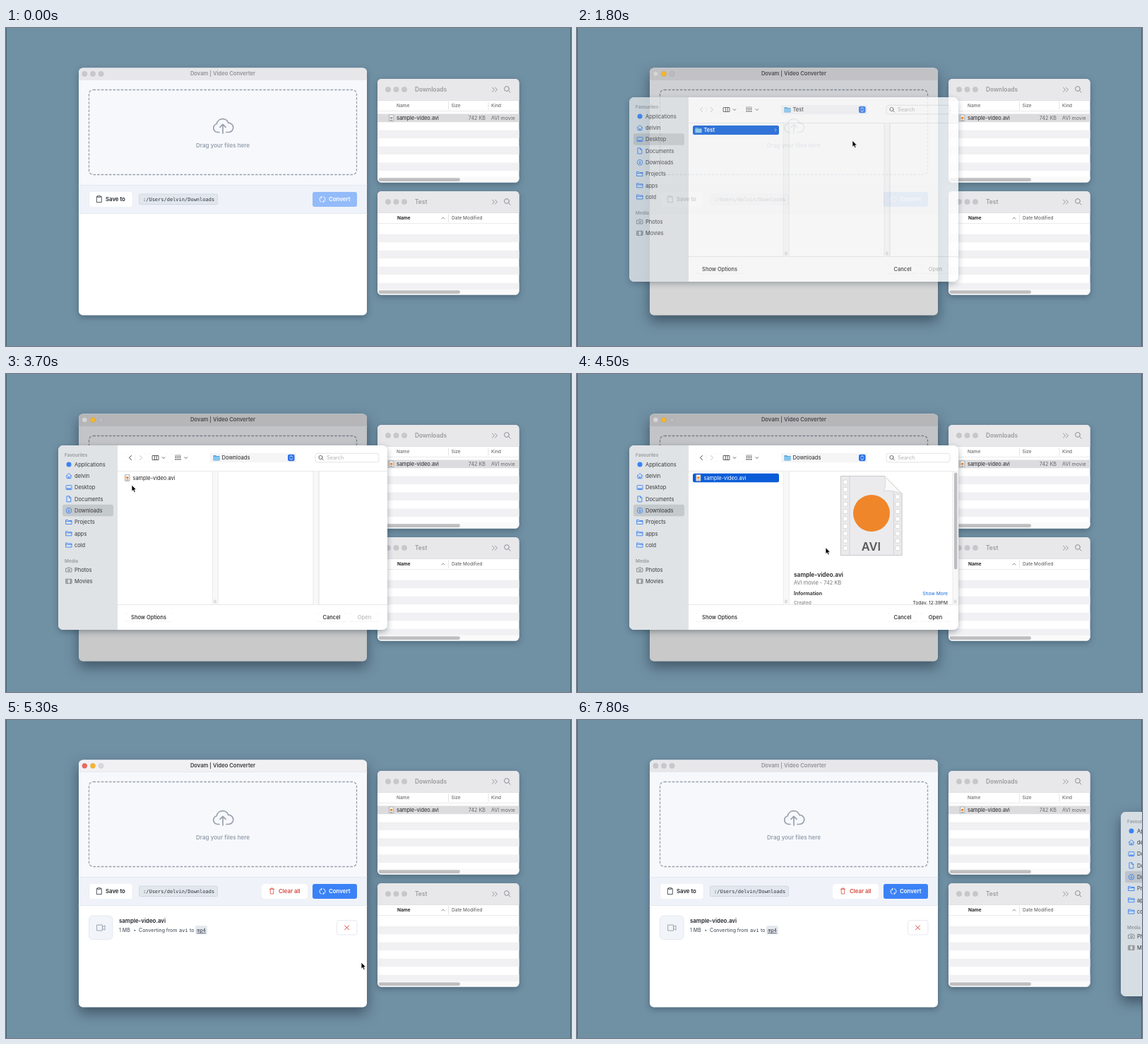
Animation of 800 by 450 pixels, one loop 8000 ms. Source, as an HTML page:

```html
<!DOCTYPE html>
<html lang="en">
<head>
<meta charset="utf-8">
<title>Video converter</title>
<style>
  html, body { margin: 0; width: 100%; height: 100%; overflow: hidden; background: #7090a4; }
  svg { display: block; width: 800px; height: 450px; font-family: Inter, Roboto, sans-serif; }
  text { white-space: pre; }
  .mono { font-family: "DejaVu Sans Mono", monospace; }
  .b { font-weight: 600; }
  .m { font-weight: 500; }
  .line { fill: none; stroke-linecap: round; stroke-linejoin: round; }
  .soft { filter: drop-shadow(0 3px 4px rgba(20, 35, 50, .36)); }
  .deep { filter: drop-shadow(0 8px 9px rgba(15, 25, 40, .5)); }
  .btn { filter: drop-shadow(0 .5px .7px rgba(0, 0, 0, .22)); }
</style>
</head>
<body>
<svg id="stage" viewBox="0 0 800 450"></svg>
<script>
const APP = 'Dovam', USER = 'delvin', FILE = 'sample-video.avi';
const BLUE = '#3b82f6', GREY = '#9b9b9e', INK = '#262629', RED = '#d4483f', ORANGE = '#f0862a';

const text = (x, y, s, size, fill = INK, attrs = '') =>
  `<text x="${x}" y="${y}" font-size="${size}" fill="${fill}" ${attrs}>${s}</text>`;
const rect = (x, y, w, h, r, fill, attrs = '') =>
  `<rect x="${x}" y="${y}" width="${w}" height="${h}" rx="${r}" fill="${fill}" ${attrs}/>`;
const dot = (x, y, r, fill, attrs = '') => `<circle cx="${x}" cy="${y}" r="${r}" fill="${fill}" ${attrs}/>`;
const line = (d, color, w = 1, attrs = '') =>
  `<path class="line" d="${d}" stroke="${color}" stroke-width="${w}" ${attrs}/>`;
const group = (id, ...parts) => `<g id="${id}">${parts.join('')}</g>`;
const at = (x, y, s) => `<g transform="translate(${x} ${y})">${s}</g>`;
const range = (n, fn) => Array.from({ length: n }, (_, i) => fn(i)).join('');
const BOLD = 'class="b"', MED = 'class="m"', MID = 'text-anchor="middle"', END = 'text-anchor="end"';

const lens = (x, y, r, color) =>
  line(`M${x + r} ${y}a${r} ${r} 0 1 0 ${-2 * r} 0a${r} ${r} 0 1 0 ${2 * r} 0M${x + r * .7} ${y + r * .7}l${r * .8} ${r * .8}`, color, .9);
const folder = (x, y) =>
  `<path d="M${x} ${y - 3.5}h3.5l1 1h4.5v6.5h-9z" fill="#58a6dc"/>` + rect(x, y - 1.5, 9, 5, .6, '#84c6ee');
const filePic = (x, y) =>
  rect(x, y, 6.6, 9, .4, '#fbfbfb', 'stroke="#8f8f92" stroke-width=".6"') +
  line(`M${x + 1} ${y + 1}v7M${x + 5.6} ${y + 1}v7`, '#a9a9ab', .5, 'stroke-dasharray=".6 1"') +
  dot(x + 3.3, y + 4.2, 1.7, ORANGE, 'class="badge"') + rect(x + 1.8, y + 7, 3, .9, 0, '#77777a');

// Finder-like list windows
function listWindow(y, title, top, bands, body) {
  const h = 146.5;
  return rect(526, y, 200.5, h, 5.5, '#fff', 'class="soft"') +
    `<path d="M526 ${y + 30.5}v-25a5.5 5.5 0 0 1 5.5-5.5h189.5a5.5 5.5 0 0 1 5.5 5.5v25z" fill="#e8e7ea"/>` +
    [541, 552.5, 564].map(x => dot(x, y + 15, 3.6, '#c8c7ca', 'stroke="#b9b8bb" stroke-width=".5"')).join('') +
    text(579, y + 18, title, 8.4, GREY, BOLD) +
    line(`M688.5 ${y + 12.3}l3 2.9-3 2.9M692.5 ${y + 12.3}l3 2.9-3 2.9`, '#8d8d90', .9) +
    lens(709, y + 14, 3.4, '#858588') +
    range(bands, i => rect(526, top + i * 23, 200.5, 11.5, 0, '#f1f1f3')) +
    line(`M526.5 ${y + 30.5}h199.5`, '#d6d5d8', .6) + line(`M526.5 ${y + 45.5}h199.5`, '#e2e2e4', .7) +
    line(`M626.5 ${y + 32.5}v11`, '#d9d9db', .7) +
    `<path d="M526 ${y + 138.5}h200.5v2.5a5.5 5.5 0 0 1-5.5 5.5h-189.5a5.5 5.5 0 0 1-5.5-5.5z" fill="#fafafa"/>` +
    rect(527.5, y + 140.3, 115.5, 4.6, 2.3, '#bfbfc1') + body;
}

const downloads = listWindow(72, 'Downloads', 144.5, 3,
  line('M683 104.5v11', '#d9d9db', .7) +
  text(553, 112.2, 'Name', 6.5, '#6c6c70', MED) + text(630.5, 112.2, 'Size', 6.5, '#6c6c70', MED) +
  text(687, 112.2, 'Kind', 6.5, '#6c6c70', MED) +
  rect(526, 121.5, 200.5, 11.7, 0, '#dcdcde') + filePic(542.3, 123) +
  text(553, 130, FILE, 7.4) + text(679, 130, '742 KB', 7.2, '#6a6a6d', END) + text(687, 130, 'AVI movie', 7.2, '#6a6a6d'));

const test = listWindow(231, 'Test', 291.7, 3,
  rect(526, 360.7, 200.5, 9, 0, '#f1f1f3') +
  text(554, 271, 'Name', 6.5, INK, 'font-weight="700"') + line('M617 270l2-2 2 2', '#77777a', .8) +
  text(631, 271, 'Date Modified', 6.5, '#6c6c70', MED));

// Main window
const swirl = x => line(`M${x - 1.5} 246.3a4 4 0 0 1-.6-7.1l1.4-.4M${x + 1.5} 238.7a4 4 0 0 1 .6 7.1l-1.4.4M${x - 1.4} 238.8l-.2 2M${x + 1.4} 246.2l.2-2`, '#fff', .9);
const button = (x, y, w, h = 21) => rect(x, y, w, h, 3, '#fff', 'class="btn"');

const main =
  rect(103, 56.5, 408, 350, 6, '#fff', 'id="shadow"') +
  '<path id="bar" d="M103 73.5v-11a6 6 0 0 1 6-6h396a6 6 0 0 1 6 6v11z"/>' +
  rect(103, 73.5, 408, 149, 0, '#f6f8fc') + rect(103, 222.5, 408, 40, 0, '#eff3f9') +
  line('M103 73.5h408M103 222.5h408M103 262.5h408', '#e0e5ec', .8) +
  text(307, 67.4, `${APP} | Video Converter`, 7.6, INK, 'class="b" text-anchor="middle" id="title"') +
  rect(117.5, 87.5, 379, 120, 6, 'none', 'stroke="#98a1ad" stroke-width="1.3" stroke-dasharray="3.6 2"') +
  line('M302 147.5h-2.5a6 6 0 0 1-1.2-11.8a8.6 8.6 0 0 1 16.6-1.3a5.9 5.9 0 0 1 .6 13.1h-3.5M307 149v-12M303 140.3l4-4 4 4', '#98a1ad', 1.7) +
  text(307, 169, 'Drag your files here', 8.1, '#8b96a4', `${MED} ${MID}`) +
  button(117.5, 232, 62) +
  line('M129.3 238.6h-1v8h7v-8h-1M129.8 237.6h4v1.8h-4z', '#3f4650', .9) +
  text(141, 245.3, 'Save to', 7.8, '#20242b', BOLD) +
  rect(188.5, 235, 111, 14.7, 2, '#e2e7ed', 'stroke="#c9d0d8" stroke-width=".7"') +
  text(194, 244.7, `:/Users/${USER}/Downloads`, 7, '#2c333d', 'class="mono"') +
  rect(434, 232, 63, 21, 3, BLUE, 'id="convert"') + swirl(448) +
  text(457, 245.3, 'Convert', 7.9, '#fff', BOLD) +
  group('item',
    button(362, 232, 65),
    line('M373.5 239.3h6M375 239v-1h3v1M374 239.5l.4 6.5h4.2l.4-6.5', RED, .8),
    text(386, 245.3, 'Clear all', 7.8, RED, BOLD),
    rect(117.5, 277, 33.5, 33.5, 5, '#f1f4f9', 'stroke="#e0e5ec" stroke-width=".8"'),
    line('M129 290h7.5v8h-7.5zM136.5 293l3.5-2.2v6.4l-3.5-2.2', '#9aa4b1', 1),
    text(160, 286.7, FILE, 7.9, '#20242b', BOLD),
    text(160, 300, '1 MB', 7, '#565e69', MED), dot(182.3, 297.8, 1, '#565e69'),
    text(188, 300, 'Converting from', 7, '#565e69', MED),
    text(245, 300, 'avi', 7, '#30363f', 'class="mono"'), text(260, 300, 'to', 7, '#565e69', MED),
    rect(268, 291, 17, 13, 2, '#e5e9ef'),
    text(270.2, 300, 'mp4', 7, '#30363f', 'class="mono" text-decoration="underline"'),
    rect(468.5, 283.5, 28.5, 20.5, 3, '#fff', 'stroke="#e6e9ee" stroke-width="1"'),
    line('M479.5 290.8l6 6M485.5 290.8l-6 6', RED, 1)) +
  rect(103, 56.5, 408, 350, 6, '#000', 'id="dim"') +
  [111.3, 123, 134.5].map((x, i) => dot(x, 64.8, 3.6, '#ccc', `id="light${i}" stroke="rgba(0,0,0,.13)" stroke-width=".5"`)).join('');

// File dialog
const home = line('M-4 0l4-3.6 4 3.6M-2.8-.6v4h5.6v-4M-.7 3.2v-2.2h1.4v2.2', BLUE, .9);
const desk = rect(-4, -3, 8, 6, .8, 'none', `stroke="${BLUE}" stroke-width=".9"`) + rect(-3, 1, 6, 1.2, 0, BLUE);
const doc = line('M-2.7-4h3.3l2.2 2.2v5.8h-5.5zM.5-4v2.3h2.3', BLUE, .9);
const down = dot(0, 0, 3.8, 'none', `stroke="${BLUE}" stroke-width=".9"`) + line('M0-1.8v3.4M-1.4.4l1.4 1.4 1.4-1.4', BLUE, .9);
const dir = line('M-4-3h2.6l1 1h4.4v5h-8zM-4-.9h8', BLUE, .9);
const camera = line('M-4-2h2l.8-1.2h2.4l.8 1.2h2v5h-8zM1.4.4a1.4 1.4 0 1 0-2.8 0a1.4 1.4 0 1 0 2.8 0', '#77797c', .8);
const film = line('M-4-3h8v6h-8zM-2.2-3v6M2.2-3v6M-4-1h1.8M-4 1h1.8M2.2-1h1.8M2.2 1h1.8', '#77797c', .8);
const places = [
  ['Applications', dot(0, 0, 3.5, BLUE)], [USER, home], ['Desktop', desk], ['Documents', doc],
  ['Downloads', down], ['Projects', dir], ['apps', dir], ['cold', dir]];
const entry = ([name, icon], y) => at(89, y, icon) + text(97, y + 2.7, name, 7.5, '#38393c');
const DESKTOP_Y = 152.3, DOWNLOADS_Y = 184.8;

const sidebar = (fill, selAttr = '') =>
  `<path d="M158 101v261h-77a7 7 0 0 1-7-7v-247a7 7 0 0 1 7-7z" fill="${fill}"/>` +
  rect(80, DOWNLOADS_Y, 72, 16.5, 3, 'rgba(60,65,70,.16)', selAttr) +
  text(83, 117, 'Favourites', 6.4, '#94989c', BOLD) +
  places.map((p, i) => entry(p, 128 + i * 16.3)).join('') +
  text(83, 266.5, 'Media', 6.4, '#94989c', BOLD) + entry(['Photos', camera], 277) + entry(['Movies', film], 293.3);

const grip = x => line(`M${x - 1} 320v4M${x + 1} 320v4`, '#b4b4b6', .7);
const strip = x => rect(x, 137.5, 8, 189, 0, '#f8f8f8') + line(`M${x} 137.5v189M${x + 8} 137.5v189`, '#e4e4e6', .7);
const pill = (x, w, label, attrs = '') =>
  rect(x, 338, w, 12.7, 3, '#fff', 'class="btn"') + text(x + w / 2, 346.7, label, 7.5, INK, `${MID} ${attrs}`);
const holes = x => range(10, i => rect(x, 150 + i * 10.4, 6, 6, 1, '#fff', 'stroke="#c8c8ca" stroke-width=".6"'));

const preview = group('preview',
  rect(164, 140.8, 122, 12.5, 2.5, '#0a5cd8', 'id="row"'),
  strip(532), grip(535.5),
  rect(534, 139.5, 4.4, 137, 2.2, '#bdbdbf'),
  '<path d="M373.5 144.5h62l24.5 25v87h-86.5z" fill="#ebebed" stroke="#c2c2c5" stroke-width=".7" class="btn"/>',
  rect(385.5, 145, 1, 111, 0, '#d3d3d5'), rect(448, 158, 1, 98, 0, '#d3d3d5'),
  holes(377), range(8, i => rect(451, 170.8 + i * 10.4, 6, 6, 1, '#fff', 'stroke="#c8c8ca" stroke-width=".6"')),
  '<path d="M435.5 144.5q3 12-1 21q11-2 25.500 4z" fill="#fafafa" stroke="#c6c6c8" stroke-width=".6"/>',
  dot(417, 197, 26, ORANGE),
  text(416.5, 249.7, 'AVI', 16.5, '#5a5a5d', `${BOLD} ${MID}`),
  text(307, 286.8, FILE, 8.4, INK, BOLD), text(307, 298.2, 'AVI movie - 742 KB', 7.4, '#77777a'),
  text(307, 312.7, 'Information', 7.2, INK, BOLD), text(525, 312.7, 'Show More', 6.7, '#1668dc', END),
  '<g clip-path="url(#fold)">' + text(307, 325.7, 'Created', 6.6, '#77777a') +
  text(525, 325.7, 'Today, 12:39PM', 6.6, INK, END) + '</g>');

const dialog = group('dialog',
  rect(74, 101, 466, 261, 7, '#fff', 'class="soft"'),
  sidebar('#dfe3e6', 'id="sel"'),
  rect(168, 112, 30, 13, 3, '#fff', 'class="btn"'), line('M183 114v9', '#e4e4e6', .6),
  line('M177.5 115.500l-3 3 3 3', '#47474a', 1, 'id="back"'), line('M189.500 115.500l3 3-3 3', '#c3c3c5', 1),
  rect(202, 112, 27, 13, 3, '#fff', 'class="btn"'), rect(234, 112, 26, 13, 3, '#fff', 'class="btn"'),
  line('M207.500 115.500h8.500v6h-8.500zM210.400 115.500v6M213.200 115.500v6M221.200 117.700l1.800 1.800 1.800-1.800M253 117.700l1.800 1.800 1.800-1.800', '#4d4d50', .9),
  range(6, i => rect(239.5 + (i % 3) * 3, 116.5 + (i > 2) * 3.2, 2, 2, .3, '#6a6a6d')), line('M239.500 115h8', '#6a6a6d', .7),
  rect(289, 112, 122, 13, 3, '#f5f5f6', 'class="btn"'), folder(293.5, 118.5),
  text(305.5, 121.3, 'Test', 7.6, INK, 'id="place"'),
  rect(399, 113.7, 9.6, 9.6, 2.2, '#2f74ea', 'id="step"'),
  line('M402 117.300l1.800-1.700 1.800 1.700M402 119.700l1.800 1.700 1.800-1.700', '#fff', .9, 'id="arrows"'),
  rect(438, 112.3, 90, 12.5, 3, '#fff', 'stroke="#dcdcde" stroke-width=".8"'), lens(445.5, 118, 2.6, '#59595c'),
  text(454, 121.3, 'Search', 7.3, '#b0b0b2'),
  line('M158 137.500h382M158 326.500h382', '#e2e2e4', .8), strip(292.3), grip(296),
  group('columns', strip(435), line('M443 137.500v189', '#e4e4e6', .7)),
  group('desktop', grip(439), rect(164, 141, 122, 13, 2.5, '#0a5cd8'), folder(167.5, 147.5),
    text(179.5, 150, 'Test', 7.5, '#fff', BOLD), line('M280.300 145.700l1.600 1.800-1.600 1.800', '#cfe0ff', .8)),
  preview,
  group('listing', filePic(168.5, 142.5), text(179.5, 149.9, FILE, 7.4, INK, 'id="rowText"')),
  pill(169, 66, 'Show Options', MED), pill(440, 42, 'Cancel', MED), pill(487, 41, 'Open', 'id="open" class="m"'));

const panel = `<g id="panel" transform="translate(696 29)">${rect(74, 101, 466, 261, 7, '#d6dee3', 'class="deep"')}${sidebar('#d6dee3')}</g>`;
const cursor = group('cursor',
  '<path id="arrow" d="M0 0v9.200l2.100-1.900 1.400 3.200 1.700-.7-1.400-3.100h2.800z" fill="#000" stroke="#fff" stroke-width=".8" stroke-linejoin="round"/>',
  '<path id="hand" d="M-.9.800q.9-1.300 1.700 0l.7 3 4 1.200q1 .3.800 1.500l-.7 3.300h-4.400l-3.300-3.800q-.2-1.200 1.300-.7l.5.400z" fill="#fff" stroke="#000" stroke-width=".8" stroke-linejoin="round"/>');

document.getElementById('stage').innerHTML =
  '<defs><clipPath id="fold"><rect x="300" y="300" width="232" height="26"/></clipPath></defs>' +
  rect(0, 0, 800, 450, 0, '#7090a4') + line('M.3 0v450M799.700 0v450', '#3d5564', .9) +
  downloads + test + main + dialog + panel + cursor;

const $ = id => document.getElementById(id);
const show = (id, on) => { $(id).style.display = on ? '' : 'none'; };
const fill = (id, color) => $(id).setAttribute('fill', color);

// time, x, y
const path = [
  [600, 690, 165], [1100, 443, 156], [1400, 400, 160], [1700, 400, 160], [2300, 264, 149.5], [2500, 236, 155],
  [2900, 112, 191], [3300, 112, 192], [3700, 178, 157], [3900, 196, 149], [4200, 200, 149],
  [4800, 504, 342], [5100, 506, 344.5], [5300, 503, 343], [5500, 490, 336], [6600, 131, 241],
  [6900, 131, 241], [7700, 812, 238]];
const ease = k => k * k * (3 - 2 * k);
function pointer(t) {
  const i = Math.max(1, path.findIndex(p => p[0] >= t));
  const [a, b] = [path[i - 1], path[i]];
  const k = ease((t - a[0]) / (b[0] - a[0]));
  return [a[1] + (b[1] - a[1]) * k, a[2] + (b[2] - a[2]) * k];
}
// opacity and lift of the dialog, dimming of the window behind
function sheet(t) {
  if (t < 1700 || t >= 5300) return [0, 0, 0];
  if (t < 1900) return t < 1800 ? [.35, -8, .08] : [.8, -3, .16];
  if (t < 5100) return [1, 0, .21];
  return t < 5200 ? [.76, -4.5, .14] : [.3, -10, .05];
}

function draw(t) {
  const [alpha, lift, dim] = sheet(t);
  const open = alpha > 0, closing = t >= 5100 && open;
  const active = t >= 900 && t < 6900;
  const added = t >= 5300, atDownloads = t >= 3100, picked = t >= 4000;

  $('shadow').setAttribute('class', active ? 'deep' : 'soft');
  fill('bar', active && !open ? '#f1f1f4' : '#e7e7ea');
  fill('title', !active ? '#929296' : open && !closing ? '#5c5c60' : '#3a3a3d');
  fill('light0', !active ? '#c9c9cc' : open ? '#d5d5d7' : '#ec6a5e');
  fill('light1', active ? '#f5b52e' : '#c9c9cc');
  fill('light2', open ? '#bcbcbe' : active ? '#d9d9db' : '#c9c9cc');
  fill('convert', added ? BLUE : '#93bbf9');
  show('item', added);
  $('dim').setAttribute('opacity', dim);
  document.querySelectorAll('.badge').forEach(b => b.setAttribute('fill', t < 1700 ? '#a5a3a2' : ORANGE));

  show('dialog', open);
  $('dialog').setAttribute('opacity', alpha);
  $('dialog').setAttribute('transform', `translate(0 ${lift})`);
  $('sel').setAttribute('y', atDownloads ? DOWNLOADS_Y : DESKTOP_Y);
  $('place').textContent = atDownloads ? 'Downloads' : 'Test';
  $('back').setAttribute('stroke', atDownloads ? '#47474a' : '#c3c3c5');
  show('desktop', !atDownloads);
  show('listing', atDownloads);
  show('columns', !picked);
  show('preview', picked);
  fill('row', closing ? '#dcdcde' : '#0a5cd8');
  fill('rowText', picked && !closing ? '#fff' : INK);
  show('step', !closing);
  $('arrows').setAttribute('stroke', closing ? '#4d4d50' : '#fff');
  fill('open', picked ? INK : '#b9b9bb');

  show('panel', t >= 6900);
  $('panel').setAttribute('opacity', t < 7000 ? .5 : 1);

  const visible = t >= 600 && t < 7700;
  show('cursor', visible);
  if (visible) $('cursor').setAttribute('transform', `translate(${pointer(t).join(' ')})`);
  const hand = (t >= 5000 && t < 5300) || (t >= 6600 && t < 7000);
  show('hand', hand);
  show('arrow', !hand);
}

const LOOP = 8000, STEP = 100, start = performance.now();
let last = -1;
function tick() {
  const t = Math.floor(((performance.now() - start) % LOOP) / STEP) * STEP;
  if (t !== last) draw(last = t);
  requestAnimationFrame(tick);
}
tick();
</script>
</body>
</html>
```
